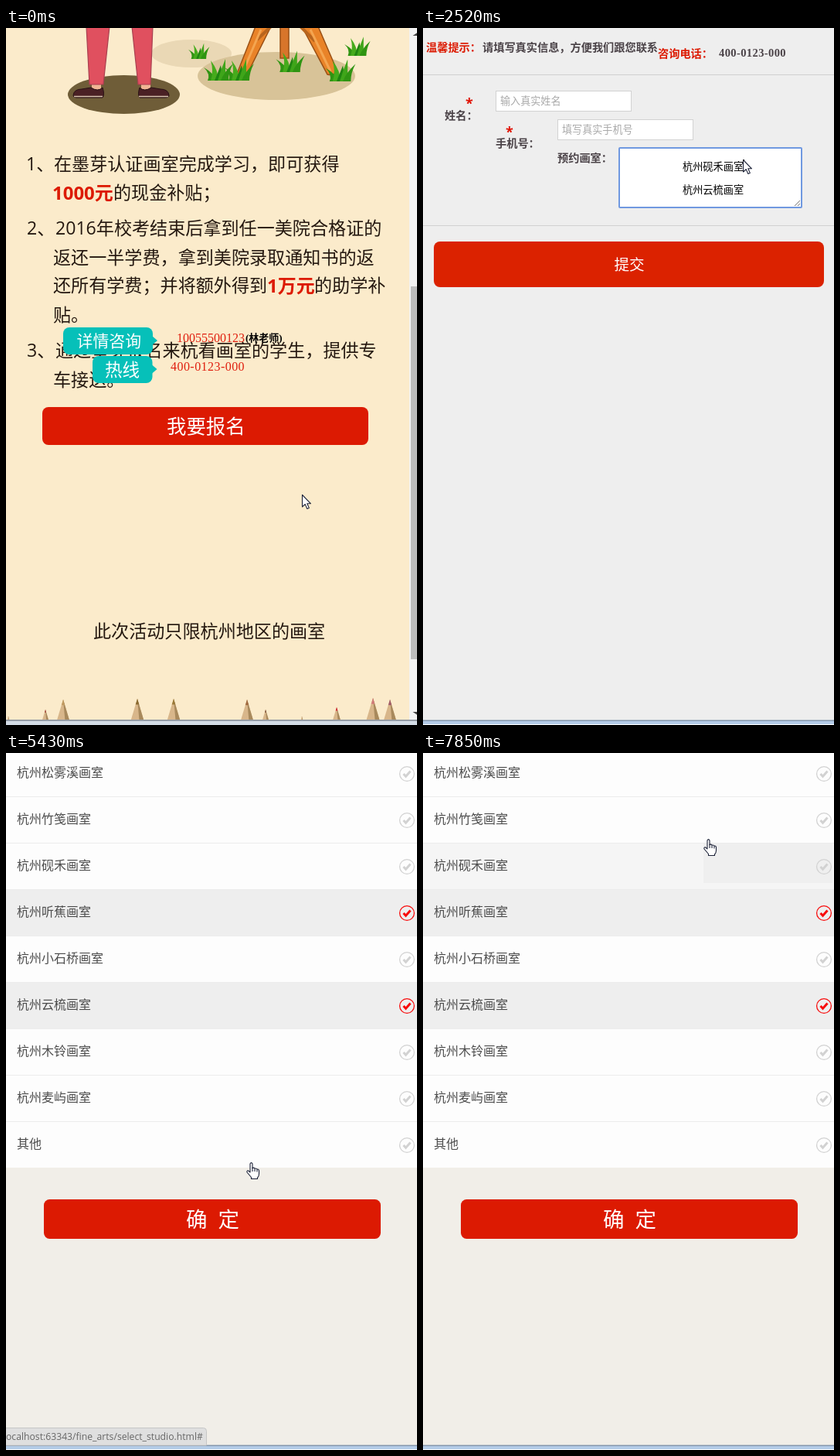
An HTML page for the animation above (8 s loop, 532 px wide and 901 px high).

```html
<!DOCTYPE html>
<html lang="zh-CN">
<head>
<meta charset="utf-8">
<title>预约画室</title>
<style>
html, body { margin: 0; width: 100%; height: 100%; overflow: hidden; background: #eee; }
svg { display: block; width: 532px; height: 901px; }
text { font-family: "Open Sans", "Noto Sans CJK SC", "Noto Sans CJK", sans-serif; white-space: pre; }
.num { font-family: "Liberation Serif", "Noto Sans CJK SC", serif; }
</style>
</head>
<body>
<svg id="stage" viewBox="0 0 532 901" xmlns="http://www.w3.org/2000/svg"></svg>
<script>
const LOOP = 8000;
const RED = '#dc1a02', INK = '#241810', LABEL = '#4a4247';
const HOTLINE = '400-0123-000';
const STUDIOS = ['松雾溪', '竹笺', '砚禾', '听蕉', '小石桥', '云梳', '木铃', '麦屿']
  .map(n => `杭州${n}画室`);
const ROWS = [...STUDIOS, '其他'];

// --- drawing helpers ---
const rect = (x, y, w, h, fill, more = '') =>
  `<rect x="${x}" y="${y}" width="${w}" height="${h}" fill="${fill}" ${more}/>`;
const path = (d, fill, more = '') => `<path d="${d}" fill="${fill}" ${more}/>`;
const oval = (x, y, rx, ry, fill) =>
  `<ellipse cx="${x}" cy="${y}" rx="${rx}" ry="${ry}" fill="${fill}"/>`;
// cy is the middle of the line
const text = (x, cy, size, str, fill, more = '') =>
  `<text x="${x}" y="${cy + size * 0.36}" font-size="${size}" fill="${fill}" ${more}>${str}</text>`;
const bold = 'font-weight="700"';
const group = (id, body, more = '') => `<g id="${id}" ${more}>${body}</g>`;
const line = (y, w) => rect(0, y, w, 1, '#d0d0d0');

// --- poster page ---
function grass(x, y, s) {
  const blade = (a, b, h, c) => path(`M${a - 5} 0Q${a - 1} ${-h / 2} ${b} ${-h}Q${a + 5} ${-h / 2} ${a + 5} 0z`, c);
  return `<g transform="translate(${x} ${y}) scale(${s})">` +
    blade(-8, -18, 17, '#2f9412') + blade(-4, -9, 26, '#46ab1c') + blade(1, 4, 20, '#1f8410') +
    blade(5, 10, 28, '#3fa51a') + blade(9, 20, 22, '#2f9412') + '</g>';
}

function pencil([x, top, tint]) {
  const half = (894 - top) * 0.3, tip = (894 - top) * 0.28;
  return path(`M${x} ${top}L${x - half} 894H${x + half}z`, '#d8b68a') +
    path(`M${x} ${top}L${x + half * 0.3} 894H${x + half}z`, '#a8895c') +
    path(`M${x} ${top}l${-tip * 0.3} ${tip}h${tip * 0.6}z`, tint);
}

function figure() {
  const trouser = 'stroke="#a84050" stroke-width="1.2"';
  const shoe = d => path(d, '#4a2024', 'stroke="#271015"');
  const wood = 'stroke="#9a5015" stroke-width="1.5"';
  return oval(240, 33, 52, 18, '#ead8b5') + oval(350, 62, 102, 31, '#d8c398') +
    oval(152.5, 86, 72.5, 25, '#6f5d38') +
    rect(111, 71, 12, 11, '#f0b594') + rect(175, 71, 12, 11, '#f0b594') +
    path('M104 -2H134L126 73H108z', '#e0505f', trouser) +
    path('M163 -2H190L187 73H171z', '#e0505f', trouser) +
    shoe('M87 87Q88 79 98 79L110 77Q119 83 125 77Q128 86 125 90H91Q87 90 87 87z') +
    shoe('M211 87Q210 79 200 79L188 77Q179 83 173 77Q170 86 173 90H206Q211 90 211 87z') +
    path('M88 88.5H125M172 88.5H210', 'none', 'stroke="#d8c4b0" stroke-width="1.6"') +
    path('M323 -2H343L311 62Q304 65 299 59z', '#e98328', wood) +
    path('M355 -2H366V39H355z', '#d8752a', wood) +
    path('M383 -2H404L429 56Q424 62 416 60z', '#e98328', wood) +
    path('M325 15L343 -2M381 -2L400 17', 'none', 'stroke="#b8651d" stroke-width="4"') +
    path('M330 2L306 58M394 2L420 56', 'none', 'stroke="#f4a550" stroke-width="3"') +
    grass(249, 40, 0.72) + grass(274, 68, 1) + grass(301, 68, 1) + grass(367, 57, 0.98) +
    grass(432, 69, 1.02) + grass(454, 36, 0.88);
}

function bubble(x, y, w, str, tx, size) {
  const r = x + w, m = y + 17;
  return rect(x, y, w, 35, '#06c0b9', 'rx="8"') +
    path(`M${r - 1} ${m - 6}l7 6l-7 6z`, '#06c0b9') + text(tx, y + 17.5, size, str, '#fff');
}

function poster() {
  const copy = [
    [26, 176, '1、'], [62, 176, '在墨芽认证画室完成学习，即可获得'],
    [139, 213, '的现金补贴；'],
    [27, 259, '2、'], [64, 259, '2016年校考结束后拿到任一美院合格证的'],
    [61, 297, '返还一半学费，拿到美院录取通知书的返'],
    [61, 333, '还所有学费；并将额外得到'], [399, 333, '的助学补'],
    [61, 371, '贴。'],
    [27, 417, '3、'], [64, 417, '通过墨芽报名来杭看画室的学生，提供专'],
    [61, 455, '车接送。'], [113, 780, '此次活动只限杭州地区的画室']
  ];
  const pencils = [
    [3, 890, '#8a4a3a'], [51, 881, '#a04038'], [74, 868, '#c09a60'], [170, 867, '#8a6a30'],
    [217, 867, '#9a7a38'], [312, 868, '#a06a40'], [336, 881, '#7a5038'], [383, 890, '#a07850'],
    [428, 878, '#d02030'], [475, 866, '#d07a78'], [497, 868, '#a05a68']
  ];
  return rect(0, 0, 532, 901, '#fbebcb') + figure() +
    copy.map(([x, y, s]) => text(x, y, 23.1, s, INK)).join('') +
    text(60, 213, 24, '1000元', RED, bold) + text(338, 333, 24, '1万元', RED, bold) +
    bubble(74, 387, 116, '详情咨询', 91.5, 20.9) + bubble(112, 424, 77.5, '热线', 128, 22.5) +
    text(221, 400, 16, '10055500123', '#e02010', 'class="num"') +
    text(310, 400, 13, '(林老师)', '#000', 'class="num" ' + bold) +
    text(213, 437, 16, HOTLINE, '#e02010', 'class="num" letter-spacing=".45"') +
    rect(47, 490, 422, 49, RED, 'rx="8"') + text(208, 515, 25.4, '我要报名', '#fff') +
    pencils.map(pencil).join('') +
    rect(522, 0, 10, 894, '#f2f2f2') + rect(524, 334, 8, 482, '#bcbcbc') +
    path('M526.5 10h6v-4z', '#444') + path('M526.5 884h6v4z', '#444');
}

// --- booking form ---
const label = (x, cy, str, fill = LABEL) => text(x, cy, 14.2, str, fill, bold);
const star = (x, cy) => text(x - 5, cy + 2.5, 18, '*', '#e01000', bold);
const phone = (x, cy) =>
  text(x, cy, 14.5, HOTLINE, LABEL, 'class="num" letter-spacing=".4" ' + bold);
const box = (x, y, w, h, stroke) => rect(x + .5, y + .5, w - 1, h - 1, '#fff', `stroke="${stroke}"`);
const input = (x, y, hint) => box(x, y, 176, 27, '#d2d2d2') + text(x + 6, y + 13.5, 13.1, hint, '#a9a9a9');
const grip = (x, y) => path(`M${x - 9} ${y - 2}l7 -7M${x - 5} ${y - 2}l3 -3`, 'none', 'stroke="#777"');
const NOTICE = '请填写真实信息，方便我们跟您联系';

function fields(dy, tel, studio) {
  return star(60, 95 + dy) + label(28, 113 + dy, '姓名：') + input(94, 81 + dy, '输入真实姓名') +
    star(112, 132 + dy) + label(94, 149 + dy, '手机号：') +
    input(tel[0], tel[1], '填写真实手机号') + label(studio[0], studio[1], '预约画室：');
}

function rawForm() {
  return rect(0, 0, 532, 901, '#eee') +
    path('M70 67H80V77H70z', '#444') + path('M0 0H80V72Q80 77 75 77H0z', '#fff') +
    rect(0, 53, 80, 1, '#ddd') + text(21, 64, 16.2, '确定', '#2a97e8', 'font-weight="500"') +
    label(-7, 25, '信息提交失败') + label(77, 25, NOTICE) + phone(84, 44) + line(71, 350) +
    fields(11, [14, 168], [14, 218]) +
    box(94, 205, 236, 32, '#a9a9a9') + text(95.5, 214, 13.2, '预约看哪家画室', '#a9a9a9') + grip(330, 237) +
    line(260, 350) + text(152.5, 316, 19.6, '提交', '#fff');
}

function form() {
  return rect(0, 0, 532, 901, '#eee') +
    label(4, 25, '温馨提示：', RED) + label(77, 25, NOTICE) +
    label(304, 33, '咨询电话：', RED) + phone(383, 32) + line(60, 532) +
    fields(0, [174, 118], [174, 168]) + box(254, 155, 236, 77, '#a9a9a9') +
    group('focus', rect(254, 155, 236, 77, 'none', 'stroke="#7099e0" stroke-width="2" rx="1"') +
      rect(415, 170, 1, 16, '#000')) +
    text(336, 179, 13.2, '', '#000', 'id="pick"') + text(336, 209, 13.2, STUDIOS[5], '#000') + grip(490, 232) +
    line(255, 532) + rect(14, 276, 505, 59, '#db2200', 'rx="8"') + text(247.5, 306, 19.6, '提交', '#fff');
}

// --- studio list ---
function row(name, i) {
  const y = i * 60 - 4;
  return rect(0, y, 532, 60, '#fdfdfd', `id="row${i}"`) +
    (i == 2 ? group('fade', rect(363, 116, 167, 52, '#efefef')) : '') +
    rect(0, y, 532, 1, '#ececec') + text(14, y + 29, 16, name, '#4c4c4c') +
    `<g id="tick${i}" stroke="#d2d2d2"><circle cx="519" cy="${y + 31}" r="9.4" fill="none" stroke-width="1.3"/>` +
    path(`M514.5 ${y + 31}l3 3.2l6 -6.8`, 'none', 'stroke-width="3"') + '</g>';
}

function list() {
  return rect(0, 0, 532, 901, '#f1eee8') + ROWS.map(row).join('') +
    rect(49, 577, 436, 51, RED, 'rx="7.5"') +
    text(233, 603, 27.5, '确定', '#fff', 'letter-spacing="14"');
}

const status = (id, w, str) => group(id,
  path(`M-1 895V872.5H${w - 4}q4 0 4 4V895z`, '#dfdfdf', 'stroke="#c6c6c6"') +
  text(0, 883.5, 12.2, str, '#666'));

// --- pointers ---
const edge = 'stroke="#1c2238" stroke-width="1.1" stroke-linejoin="round"';
const pointers =
  group('arrow', path('M.5 .5V16L4.2 12.6L6.8 18.5L9.3 17.4L6.8 11.8H11.5z', '#fff', edge)) +
  group('hand', path('M5 2Q6.5 -.8 8 2V7.5Q10 6.4 11 8.2Q13 7.4 14 9.2Q16.3 8.6 16.5 11V15Q16.5 18 14.5 20V21.5H6.5V19.5L1 13Q.3 11 2.5 10.8L5 13z', '#fff', edge) +
    path('M8 7v5M11 8.5v3.5M14 9.5v3', 'none', edge)) +
  group('beam', path('M-3 .5h6M0 .5v16M-3 16.5h6', 'none', 'stroke="#111"'));

document.getElementById('stage').innerHTML =
  group('poster', poster()) + group('rawForm', rawForm()) + group('form', form()) + group('list', list()) +
  group('oldBar', rect(0, 894, 532, 2, '#969da6') + rect(0, 896, 532, 5, '#d3dce6')) +
  group('newBar', rect(0, 894.5, 532, 1.5, '#8397ad') + rect(0, 896, 532, 4, '#b3cbe7') + rect(0, 900, 532, 1, '#fff')) +
  status('shortUrl', 173.5, 'ocalhost:63343/.../select_st...') +
  status('longUrl', 259.5, 'ocalhost:63343/fine_arts/select_studio.html#') + pointers;

// --- timeline: each entry holds until the next ---
const scenes = [[0, 'poster'], [930, 'rawForm'], [1060, 'form'], [2670, 'list'], [6120, 'form'], [7460, 'list']];
const moves = {
  arrow: [[0, 383, 603], [120, 362, 551], [930, 346, 516], [1610, 325, 273], [1760, 345, 245],
    [2520, 414, 170], [3330, 410, 149], [3480, 440, 145], [3600, 490, 138], [3720, 520, 144],
    [3840, 520, 142], [3960, 515, 140], [4080, 510, 140], [4230, 505, 146], [5580, 278, 607],
    [6120, 274, 615], [6390, 280, 430], [6520, 289, 246], [6660, 314, 194], [7160, 368, 165]],
  hand: [[270, 352, 531], [390, 341, 516], [1490, 322, 300], [2940, 405, 172], [3060, 405, 185],
    [3210, 367, 160], [4350, 492, 152], [4500, 440, 200], [4620, 396, 230], [4770, 400, 231],
    [5050, 407, 243], [5190, 380, 330], [5310, 335, 460], [5430, 311, 529], [5730, 272, 611],
    [5850, 269, 615], [7730, 365, 146], [7850, 363, 111]],
  beam: [[1880, 368, 215], [2000, 390, 195], [2120, 408, 180], [2240, 415, 169],
    [6800, 330, 190], [6920, 350, 180], [7040, 364, 173]]
};
const track = Object.entries(moves)
  .flatMap(([kind, steps]) => steps.map(s => [s[0], kind, s[1], s[2]]))
  .sort((a, b) => a[0] - b[0]);

const $ = id => document.getElementById(id);
const at = (table, t) => table.filter(e => e[0] <= t).pop();
const show = (id, on) => $(id).setAttribute('display', on ? 'inline' : 'none');
const within = (t, a, b) => t >= a && t < b;

function draw(t) {
  const scene = at(scenes, t)[1];
  ['poster', 'rawForm', 'form', 'list'].forEach(id => show(id, id === scene));
  show('oldBar', t < 510);
  show('newBar', t >= 510);
  show('shortUrl', within(t, 3060, 4500));
  show('longUrl', within(t, 4500, 5730));
  show('focus', within(t, 2520, 2670) || within(t, 7160, 7460));
  show('fade', t >= 7850);
  $('pick').textContent = STUDIOS[t < 6120 ? 2 : 3];

  const chosen = [5, t < 4230 ? 2 : t >= 4920 ? 3 : -1];
  ROWS.forEach((_, i) => {
    const on = chosen.includes(i);
    const hover = i === 2 && (within(t, 4230, 4500) || t >= 7730);
    $('row' + i).setAttribute('fill', on ? '#eee' : hover ? '#f5f5f5' : '#fdfdfd');
    $('tick' + i).setAttribute('stroke', on ? '#f80c0c' : '#d2d2d2');
  });

  const [, kind, x, y] = at(track, t);
  Object.keys(moves).forEach(id => show(id, id === kind));
  $(kind).setAttribute('transform', `translate(${x} ${y})`);
}

const start = performance.now();
function tick() {
  draw((performance.now() - start) % LOOP);
  requestAnimationFrame(tick);
}
tick();
</script>
</body>
</html>
```
